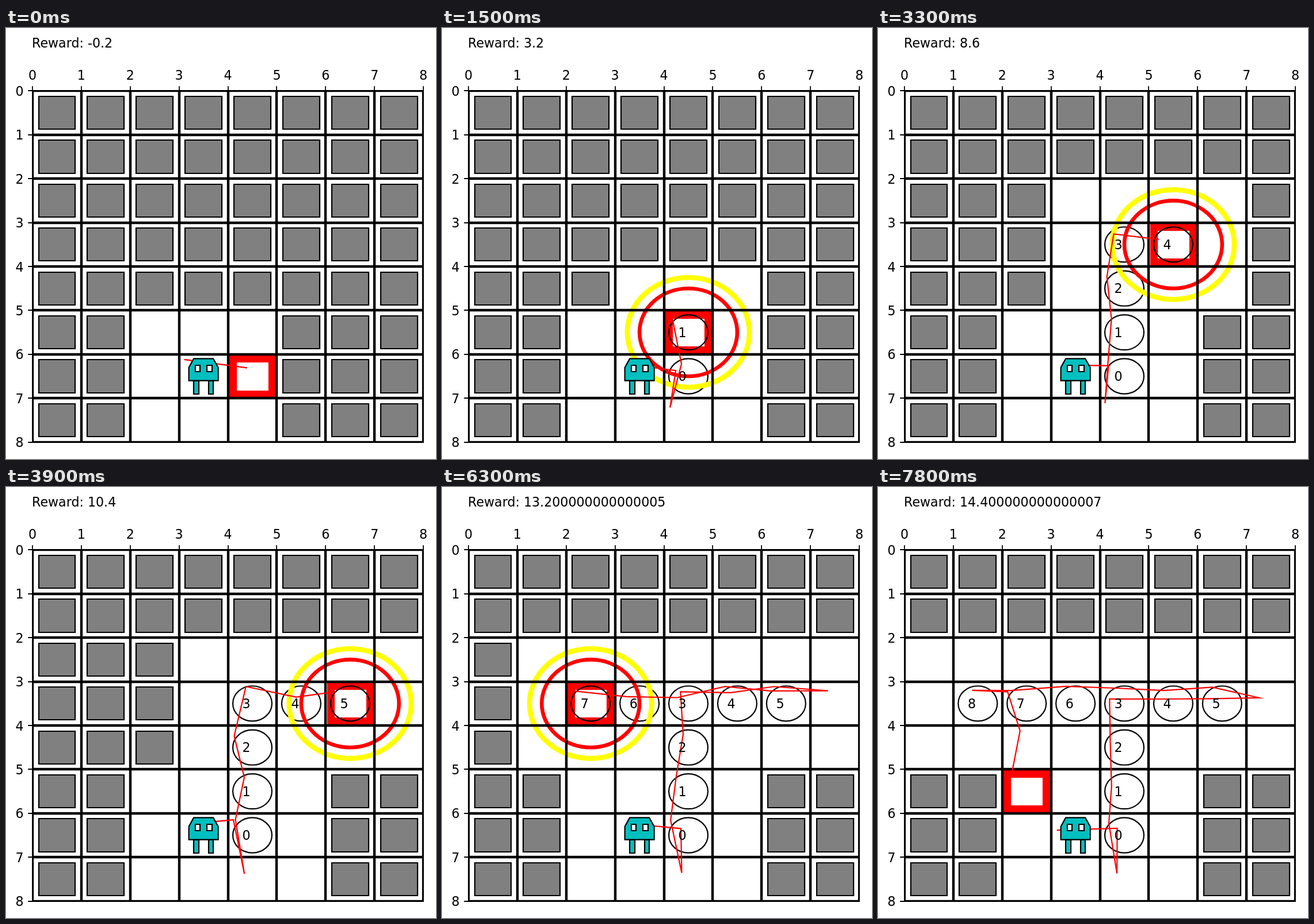
Write an HTML page with a canvas that moves like this. It is 747 px wide and 750 px high and loops after 8 s.

```html
<!DOCTYPE html>
<html lang="en">
<head>
<meta charset="utf-8">
<title>Grid explorer</title>
<style>
html, body { margin: 0; width: 100%; height: 100%; overflow: hidden; background: #fff; }
canvas { display: block; }
</style>
</head>
<body>
<canvas id="stage" width="747" height="750"></canvas>
<script>
const ctx = document.getElementById('stage').getContext('2d');
const N = 8, STEP = 300, LOOP = 8000;
const PT = 2.2;
const X = c => 45.95 + c * 84.9;
const Y = r => 109.4 + r * 76.4;

// R, L, U, D move the agent; S takes a sample and uncovers the cells around it
const PLAN = 'RSDUUSUSUSRSRSRLLLLSLSLSRDD';
const MOVES = { R: [1, 0], L: [-1, 0], U: [0, -1], D: [0, 1] };
const HOME = [3, 6];

function buildStates() {
  let pos = HOME, reward = 0, path = [HOME], samples = [], centres = [HOME];
  return [...PLAN].map(action => {
    const sensing = action === 'S';
    if (sensing) {
      samples = [...samples, pos];
      centres = [...centres, pos];
      reward += 2;
    } else {
      pos = pos.map((v, i) => v + MOVES[action][i]);
      path = [...path, pos];
      reward -= 0.2;
    }
    return { pos, reward, path, samples, centres, sensing };
  });
}
const states = buildStates();

function random(seed) {
  return () => {
    seed = (seed + 0x6D2B79F5) | 0;
    let t = Math.imul(seed ^ (seed >>> 15), 1 | seed);
    t = (t + Math.imul(t ^ (t >>> 7), 61 | t)) ^ t;
    return ((t ^ (t >>> 14)) >>> 0) / 4294967296;
  };
}

// Align straight strokes with the pixel grid
const snap = (v, pt) => Math.round(v) + (Math.round(pt * PT) % 2) / 2;

function paint(fill, stroke, pt) {
  if (fill) {
    ctx.fillStyle = fill;
    ctx.fill();
  }
  ctx.strokeStyle = stroke;
  ctx.lineWidth = pt * PT;
  ctx.stroke();
}

function trace(points, close) {
  ctx.beginPath();
  points.forEach(([c, r]) => ctx.lineTo(X(c), Y(r)));
  if (close) ctx.closePath();
}

function box(c, r, w, h, fill, stroke, pt) {
  const left = snap(X(c), pt), top = snap(Y(r), pt);
  ctx.beginPath();
  ctx.rect(left, top, snap(X(c + w), pt) - left, snap(Y(r + h), pt) - top);
  paint(fill, stroke, pt);
}

function ring([c, r], radius, colour, pt) {
  ctx.beginPath();
  ctx.ellipse(X(c + 0.5), Y(r + 0.5), radius * 84.9, radius * 76.4, 0, 0, 2 * Math.PI);
  paint(null, colour, pt);
}

function text(str, x, y, align) {
  ctx.fillStyle = '#000';
  ctx.textAlign = align;
  ctx.fillText(str, x, y);
}

function drawTiles(centres) {
  const known = (c, r) => centres.some(([a, b]) => Math.abs(a - c) < 2 && Math.abs(b - r) < 2);
  for (let r = 0; r < N; r++)
    for (let c = 0; c < N; c++)
      if (!known(c, r)) box(c + 0.125, r + 0.125, 0.75, 0.75, '#808080', '#000', 1);
}

function drawGrid() {
  const [x0, x1, y0, y1] = [X(0), X(N), Y(0), Y(N)].map(Math.round);
  ctx.save();
  ctx.beginPath();
  ctx.rect(x0, y0, x1 - x0, y1 - y0);
  ctx.clip();
  ctx.beginPath();
  for (let i = 0; i <= N; i++) {
    const x = snap(X(i), 2), y = snap(Y(i), 2);
    ctx.moveTo(x, y0);
    ctx.lineTo(x, y1);
    ctx.moveTo(x0, y);
    ctx.lineTo(x1, y);
  }
  paint(null, '#000', 2);
  ctx.restore();

  box(0, 0, N, N, null, '#000', 0.8);
  ctx.beginPath();
  for (let i = 0; i <= N; i++) {
    const x = snap(X(i), 0.8), y = snap(Y(i), 0.8);
    ctx.moveTo(x, y0);
    ctx.lineTo(x, y0 - 7.7);
    ctx.moveTo(x0, y);
    ctx.lineTo(x0 - 7.7, y);
    text(i, X(i), 90, 'center');
    text(i, 30.5, Math.round(Y(i) + 8.6), 'right');
  }
  paint(null, '#000', 0.8);
}

function drawPath(path, seed) {
  const rnd = random(seed);
  const jitter = v => v + 0.1 + 0.3 * rnd();
  trace(path.map(p => p.map(jitter)));
  paint(null, '#f00', 1);
}

function drawRobot([c, r]) {
  const teal = '#00bfbf';
  const head = [[0.2, 0.6], [0.8, 0.6], [0.8, 0.3], [0.7, 0.1], [0.3, 0.1], [0.2, 0.3]];
  trace(head.map(([x, y]) => [c + x, r + y]), true);
  paint(teal, '#000', 1);
  for (const x of [0.33, 0.575]) box(c + x, r + 0.25, 0.1, 0.15, '#fff', '#000', 1);
  for (const x of [0.3, 0.6]) box(c + x, r + 0.6, 0.1, 0.3, teal, '#000', 1);
}

const format = v => Number.isInteger(v) ? v.toFixed(1) : String(v);

function draw(index) {
  const s = states[index];
  ctx.fillStyle = '#fff';
  ctx.fillRect(0, 0, 747, 750);
  ctx.font = '22.15px "DejaVu Sans", sans-serif';
  drawTiles(s.centres);
  box(s.pos[0] + 0.1, s.pos[1] + 0.1, 0.8, 0.8, null, '#f00', 6);
  s.samples.forEach(p => ring(p, 0.4, '#000', 1));
  if (s.sensing) {
    ring(s.pos, 1, '#f00', 3);
    ring(s.pos, 1.25, '#ff0', 4);
  }
  drawGrid();
  drawPath(s.path, 7 + index * 101);
  s.samples.forEach(([c, r], i) => text(i, X(c + 0.3) - 0.4, Y(r + 0.5) + 8.2, 'left'));
  drawRobot(HOME);
  text('Reward: ' + format(s.reward), 45, 33.6, 'left');
}

let start, shown = -1;
function tick(now) {
  start ??= now;
  const index = Math.min(states.length - 1, Math.floor(((now - start) % LOOP) / STEP));
  if (index !== shown) draw(shown = index);
  requestAnimationFrame(tick);
}
draw(0);
requestAnimationFrame(tick);
</script>
</body>
</html>
```
